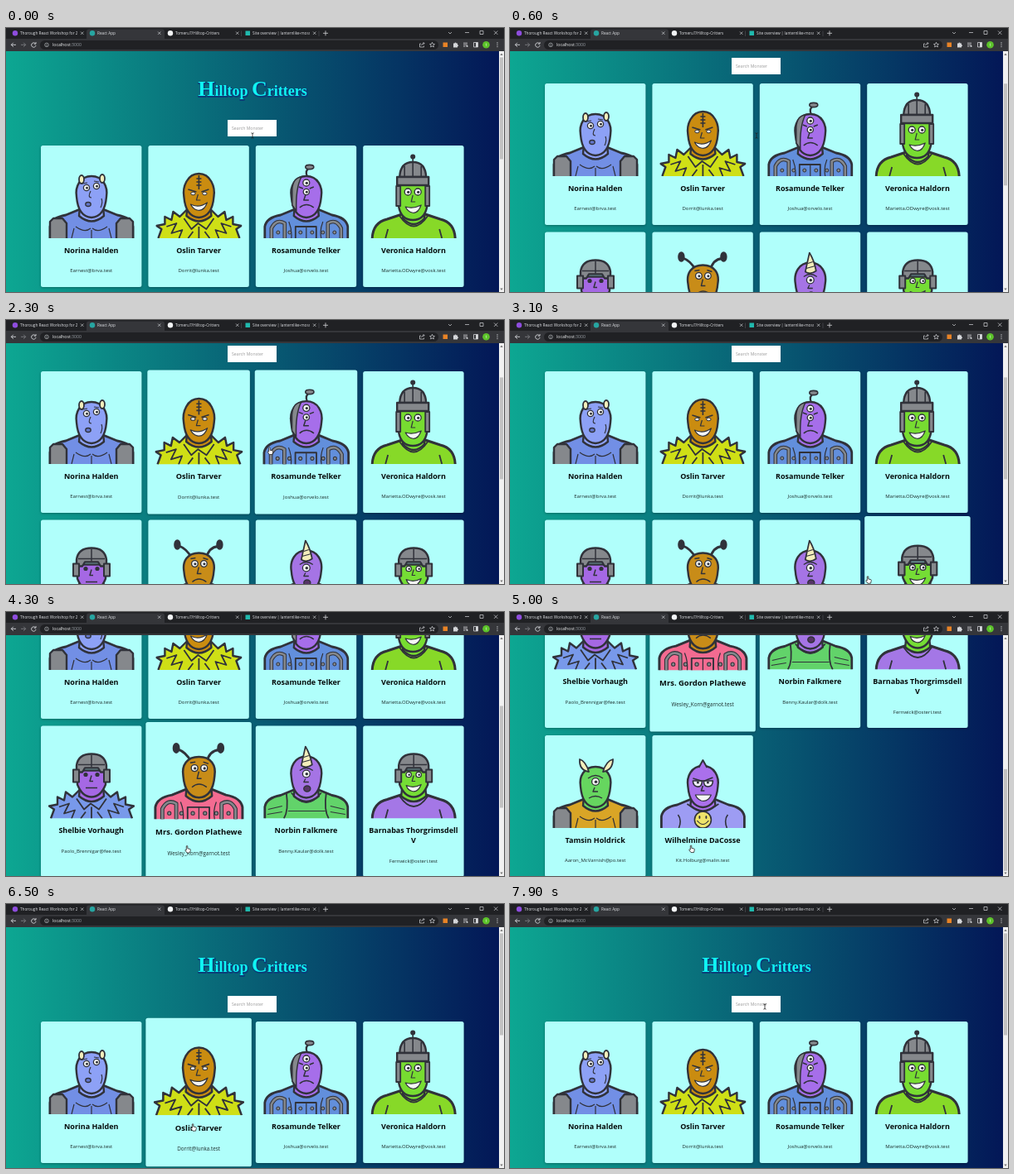
Write an HTML page with a canvas that moves like this. It is 600x319 px and loops after 8000 ms.

```html
<!DOCTYPE html>
<html lang="en">
<head>
<meta charset="utf-8">
<title>React App</title>
<style>
  html, body { margin: 0; width: 100%; height: 100%; overflow: hidden; background: #202124; }
  canvas { display: block; width: 600px; height: 319px; }
</style>
</head>
<body>
<canvas id="stage" width="600" height="319"></canvas>
<script>
const ctx = document.getElementById('stage').getContext('2d');
const LOOP = 8000, STEP = 100, TOP = 28;
const INK = '#30323a', STEEL = '#85888c', BONE = '#f3eebb', PAPER = '#b0fffb';
const SANS = '"Open Sans", "Noto Sans", sans-serif';

// ---------- drawing helpers ----------
function paint(path, fill, stroke, width) {
  if (fill) { ctx.fillStyle = fill; ctx.fill(path); }
  if (stroke) { ctx.strokeStyle = stroke; ctx.lineWidth = width; ctx.stroke(path); }
}
function shape(d, fill, stroke = INK, width = 2.4) {
  paint(new Path2D(d), fill, stroke, width);
}
function line(d, color = INK, width = 1.2) { shape(d, null, color, width); }
function oval(x, y, rx, ry, fill, stroke = INK, width = 2.4) {
  const path = new Path2D();
  path.ellipse(x, y, rx, ry, 0, 0, 7);
  paint(path, fill, stroke, width);
}
function dot(x, y, r, fill) { oval(x, y, r, r, fill, null); }
function box(x, y, w, h, fill, r = 0) {
  const path = new Path2D();
  path.roundRect(x, y, w, h, r);
  paint(path, fill);
}
function text(str, x, y, font, color, align = 'left') {
  ctx.font = font;
  ctx.fillStyle = color;
  ctx.textAlign = align;
  ctx.fillText(str, x, y);
}
function eye(x, y, r = 3.6) {
  oval(x, y, r, r, '#f4f6f4', INK, 1.3);
  dot(x + .5, y + .3, r * .4, INK);
}

// ---------- monster bodies, in a 102 x 102 box ----------
const torso = (suit) =>
  shape('M1,102 V88 Q3,77 20,74 L37,67 H65 L82,74 Q99,77 101,88 V102', suit, INK, 2.8);

const bodies = {
  pads(suit) {
    torso(suit);
    shape('M1,102 V82 L5,78 H16 L21,84 V102', STEEL);
    shape('M101,102 V82 L97,78 H86 L81,84 V102', STEEL);
    line('M27,102 L30,90 M75,102 L72,90 M51,102 V92 M32,88 Q43,96 50,90 M70,88 Q59,96 52,90');
  },
  spikes(suit) {
    shape('M2,102 L6,91 L0,87 L10,85 L10,76 L18,80 L20,70 L28,76 L37,67 H65 L74,76 L82,70 '
      + 'L84,80 L92,76 L92,85 L102,87 L96,91 L100,102', suit);
    line('M12,88 L24,84 L18,96 L31,92 L27,102 M90,88 L78,84 L84,96 L71,92 L75,102', INK, 1.8);
    line('M33,78 L42,91 L50,84 L60,91 L69,78 M38,102 L44,94 M64,102 L58,94 M51,102 V88', INK, 1.8);
  },
  pipes(suit) {
    torso(suit);
    line('M9,102 V90 Q15,78 25,84 V102 M93,102 V90 Q87,78 77,84 V102', INK, 4.6);
    line('M9,102 V90 Q15,78 25,84 V102 M93,102 V90 Q87,78 77,84 V102', STEEL, 2.6);
    shape('M38,102 V88 H63 V102', suit, INK, 1.8);
    line('M30,82 Q34,92 33,102 M71,82 Q67,92 69,102 M51,88 V102');
    for (const x of [17, 31, 44, 58, 71, 85]) oval(x, 95, 2, 2, STEEL, INK, 1);
  },
  robe(suit) {
    shape('M1,102 Q2,83 19,79 L37,73 H65 L83,79 Q100,83 101,102', suit, INK, 3);
    line('M34,75 Q51,100 68,75 M17,102 L20,91 M85,102 L82,91', INK, 1.8);
  },
  vest(suit) {
    torso(suit);
    line('M27,71 Q30,92 24,102 M75,71 Q72,92 78,102 M33,71 Q51,94 69,71', INK, 1.8);
    line('M29,93 H74 M5,91 L22,87 M97,91 L80,87 M4,97 L22,94 M98,97 L80,94');
  },
  badge(suit) {
    torso(suit);
    line('M22,102 Q26,92 21,86 M80,102 Q76,92 81,86 M32,73 Q51,87 70,73', INK, 1.6);
    oval(51, 92, 10, 10, '#eee36a', INK, 1.6);
    oval(47, 89, 1, 2, INK, null);
    oval(55, 89, 1, 2, INK, null);
    line('M44,93 Q51,102 58,93');
  }
};

// ---------- monster heads ----------
const neck = (skin) => shape('M37,64 L36,75 Q51,88 66,75 L65,64', skin);
const skull = (skin, top = 27) =>
  shape(`M51,${top} C65,${top} 71,40 69,52 Q67,76 51,77 Q35,76 33,52 C31,40 37,${top} 51,${top}Z`, skin);

function helmeted(skin) {
  neck(skin);
  shape('M34,44 H68 V61 Q62,76 51,76 Q40,76 34,61Z', skin);
  shape('M33,46 V38 Q35,24 51,24 Q67,24 69,38 V46 H62 L59,41 H43 L40,46Z', STEEL);
  line('M51,25 V40 M35,37 H67', INK, 1.5);
  shape('M29,43 H36 V58 H29Z M66,43 H73 V58 H66Z', STEEL, INK, 2);
}

const heads = {
  horned(skin) {
    neck(skin); skull(skin);
    oval(39, 31, 3, 5, BONE, INK, 1.8);
    oval(64, 30, 3, 5, BONE, INK, 1.8);
    eye(45, 41); eye(57, 39);
    line('M50,45 Q46,53 51,53 M40,36 L46,35 M54,33 L60,34');
    oval(47, 61, 3.2, 2.5, '#6376cb', INK, 1.3);
    line('M63,54 Q65,59 62,65');
  },
  stitched(skin) {
    neck(skin); skull(skin, 24);
    line('M51,26 V43 M48,30 H54 M48,34 H54 M48,38 H54 M38,43 L48,46 M63,43 L54,46', INK, 1.6);
    oval(44, 48, 2.7, 1.8, '#f4f6f4', INK, 1);
    oval(58, 48, 2.7, 1.8, '#f4f6f4', INK, 1);
    line('M50,49 L48,56 H53');
    shape('M41,61 Q51,66 61,59 Q57,70 49,68 Q44,67 41,61Z', '#f4f6f4', INK, 1.2);
  },
  antenna(skin) {
    neck(skin); skull(skin);
    shape('M34,62 V43 Q35,29 45,28 Q38,42 39,69Z', STEEL, INK, 1.5);
    line('M52,27 Q49,20 55,17', INK, 2.2);
    oval(55, 16, 5, 2.6, STEEL, INK, 1.6);
    eye(51, 35, 4); eye(51, 46, 3.6);
    line('M42,40 L47,42 M60,40 L55,42 M50,50 L48,56 H54 M43,65 Q51,58 60,65', INK, 1.5);
  },
  dome(skin) {
    shape('M38,68 V78 Q51,92 64,78 V68', skin);
    shape('M33,37 H67 V64 Q64,80 50,80 Q36,80 33,64Z', skin);
    shape('M34,28 Q35,10 50,10 Q65,10 66,28Z', STEEL);
    shape('M31,28 H69 V38 H31Z', STEEL);
    shape('M30,39 H35 V63 H30Z M65,39 H70 V63 H65Z', STEEL, INK, 1.8);
    line('M50,10 V4 M40,15 V27 M50,11 V27 M60,15 V27', INK, 1.6);
    dot(50, 3.5, 3, INK);
    eye(44, 46, 4); eye(56, 46, 4);
    line('M50,50 L48,58 H53');
    shape('M41,64 Q50,67 60,62 Q56,73 49,71 Q44,70 41,64Z', '#f4f6f4', INK, 1.2);
  },
  visor(skin) {
    helmeted(skin);
    dot(44, 49, 2.6, INK); dot(58, 49, 2.6, INK);
    line('M51,50 L49,57 H53 M44,65 H58', INK, 1.5);
  },
  feelers(skin) {
    line('M42,36 Q37,25 26,21 M60,36 Q63,23 74,22', INK, 2.8);
    oval(25, 20, 3, 5, INK); oval(76, 20, 3, 5, INK);
    neck(skin); skull(skin, 30);
    eye(46, 43, 3.8); eye(57, 43, 3.8);
    line('M41,37 L47,36 M56,36 L62,38 M51,47 L49,55 H54 M43,65 Q51,58 60,65', INK, 1.4);
  },
  unicorn(skin) {
    neck(skin); skull(skin);
    shape('M45,38 L50,15 Q56,25 58,37 Q51,42 45,38Z', BONE, INK, 1.7);
    line('M48,28 L54,26 M46,34 L57,31');
    eye(51, 48, 4.4);
    line('M43,44 Q51,38 59,44 M50,54 L48,58 H54', INK, 1.3);
    oval(52, 66, 4, 3.5, '#563466', INK, 1.4);
  },
  pilot(skin) {
    helmeted(skin);
    eye(45, 49, 3.2); eye(57, 49, 3.2);
    line('M51,50 L49,57 H53');
    shape('M42,62 Q51,66 60,61 Q56,71 49,69 Q44,68 42,62Z', '#f4f6f4', INK, 1.2);
  },
  bull(skin) {
    neck(skin); skull(skin, 28);
    shape('M43,34 Q31,32 32,19 Q39,21 43,34Z', BONE, INK, 1.8);
    shape('M60,34 Q72,32 72,19 Q64,21 60,34Z', BONE, INK, 1.8);
    eye(51, 46, 4.4);
    line('M42,42 Q51,35 60,42 M50,53 L48,58 H54 M43,66 Q51,61 59,66', INK, 1.4);
  },
  tipped(skin) {
    neck(skin); skull(skin);
    shape('M46,29 L51,20 L56,29', skin, INK, 2);
    shape('M39,45 H50 Q50,53 44,52 Q39,51 39,45Z M52,45 H63 Q63,52 57,52 Q52,52 52,45Z', '#f1efff', INK, 1.6);
    dot(45, 47, 1.5, INK); dot(57, 47, 1.5, INK);
    line('M39,42 L49,45 L53,45 L63,41 M51,51 L49,57 H53', INK, 1.6);
    shape('M42,62 H61 Q57,71 49,69 Q44,67 42,62Z', '#f4f6f4', INK, 1.2);
  }
};

const monsters = [
  ['Norina Halden', 'Earnest@brva.test', 'horned', '#8da1f6', 'pads', '#728fe5'],
  ['Oslin Tarver', 'Dorrit@lunka.test', 'stitched', '#ca8c10', 'spikes', '#cfdf16'],
  ['Rosamunde Telker', 'Joshua@orvelo.test', 'antenna', '#a66eea', 'pipes', '#628fdc'],
  ['Veronica Haldorn', 'Marietta.ODwyre@vosk.test', 'dome', '#77dc31', 'robe', '#87d928'],
  ['Shelbie Vorhaugh', 'Paolo_Brennigar@fee.test', 'visor', '#a568e4', 'spikes', '#7899ea'],
  ['Mrs. Gordon Plathewe', 'Wesley_Korn@garnot.test', 'feelers', '#c88c18', 'pipes', '#f36b91'],
  ['Norbin Falkmere', 'Benny.Kaular@dolk.test', 'unicorn', '#a574e5', 'vest', '#62d36a'],
  ['Barnabas Thorgrimsdell|V', 'Fernwick@osteri.test', 'pilot', '#75dd35', 'robe', '#a477e6'],
  ['Tamsin Holdrick', 'Aaron_McVarnish@po.test', 'bull', '#66d65f', 'pads', '#d9a526'],
  ['Wilhelmine DaCosse', 'Kit.Holburg@malin.test', 'tipped', '#aa70ec', 'badge', '#9d9cf3']
];
const rows = [[142, 171], [321.5, 182.5], [513, 171]];

// ---------- motion ----------
const scrollKeys = [[0, 0], [200, 0], [300, 12], [400, 38], [500, 62], [600, 75], [700, 80],
  [4100, 80], [4200, 112], [4300, 184], [4400, 253], [4500, 314], [4600, 352], [4700, 364],
  [5000, 364], [5100, 338], [5200, 268], [5300, 184], [5400, 110], [5500, 56], [5600, 25],
  [5700, 6], [5800, 0], [LOOP, 0]];
const cursorKeys = [[0, 297, 130], [900, 297, 130], [1200, 215, 145], [1600, 146, 151],
  [1800, 146, 151], [2100, 235, 155], [2400, 360, 160], [2650, 475, 170], [2850, 475, 250],
  [3100, 432, 314], [3400, 350, 304], [3700, 265, 290], [4000, 219, 287], [5600, 219, 286],
  [6500, 226, 270], [7000, 245, 215], [7500, 300, 130], [7900, 307, 124], [LOOP, 307, 124]];
// card index, pointer enters, pointer leaves
const hovers = [[1, 1000, 1250], [0, 1300, 1850], [1, 1900, 2150], [2, 2200, 2450], [3, 2500, 2800],
  [7, 2850, 3250], [6, 3300, 3600], [5, 3650, 5750], [1, 5800, 7250]];

const clamp = (v) => Math.max(0, Math.min(1, v));
const ease = (v) => { v = clamp(v); return v * v * (3 - 2 * v); };
function sample(keys, t) {
  const i = Math.max(1, keys.findIndex((k) => k[0] >= t));
  const a = keys[i - 1], b = keys[i], u = clamp((t - a[0]) / (b[0] - a[0]));
  return a.slice(1).map((v, n) => v + (b[n + 1] - v) * u);
}
function growth(index, t) {
  const amounts = hovers.filter((h) => h[0] === index)
    .map(([, enter, leave]) => ease((t - enter) / 250) * (1 - ease((t - leave) / 250)));
  return 1 + .05 * Math.max(0, ...amounts);
}

// ---------- page ----------
function drawCard(index, t, scroll) {
  const [name, mail, head, skin, body, suit] = monsters[index];
  const [rowTop, height] = rows[Math.floor(index / 4)];
  const x = 42 + index % 4 * 129.4, y = rowTop - scroll, width = 121.4;
  if (y > 330 || y + height < 10) return;
  const scale = growth(index, t);
  ctx.save();
  ctx.translate(x + width / 2, y + height / 2);
  ctx.scale(scale, scale);
  ctx.translate(-width / 2, -height / 2);
  ctx.shadowColor = 'rgba(0,0,0,.3)';
  ctx.shadowBlur = 3;
  ctx.shadowOffsetY = 1;
  box(0, 0, width, height, PAPER, 2.5);
  ctx.shadowColor = 'transparent';

  ctx.save();
  ctx.translate(10, 10);
  ctx.beginPath();
  ctx.rect(-1, -1, 104, 103);
  ctx.clip();
  bodies[body](suit);
  heads[head](skin);
  ctx.restore();

  const lines = name.split('|');
  lines.forEach((s, i) => text(s, width / 2, 129.5 + i * 12.3, `bold 9px ${SANS}`, '#050b0b', 'center'));
  text(mail, width / 2, 153 + (lines.length - 1) * 12.3, `6px ${SANS}`, '#1c2b2b', 'center');
  ctx.restore();
}

function drawTitle(y) {
  const font = (ch) => `bold ${/[A-Z]/.test(ch) ? 26 : 18}px "Liberation Serif", serif`;
  const letters = [...'Hilltop Critters'];
  const widths = letters.map((ch) => { ctx.font = font(ch); return ctx.measureText(ch).width; });
  let x = 297 - widths.reduce((a, b) => a + b) / 2;
  letters.forEach((ch, i) => {
    ctx.font = font(ch);
    ctx.textAlign = 'left';
    ctx.lineWidth = 2;
    ctx.strokeStyle = '#0b3d78';
    ctx.strokeText(ch, x + .5, y + .7);
    text(ch, x, y, font(ch), '#0ff5f3');
    x += widths[i];
  });
}

function drawPage(t, scroll) {
  const sky = ctx.createLinearGradient(0, 0, 594, 0);
  sky.addColorStop(0, '#0da792');
  sky.addColorStop(1, '#031757');
  ctx.fillStyle = sky;
  ctx.fillRect(0, TOP, 594, 291);
  drawTitle(82 - scroll);
  box(267, 111 - scroll, 59, 20, '#fff');
  text('Search Monster', 272, 122.8 - scroll, `5.2px ${SANS}`, '#9a9a9a');
  monsters.forEach((m, i) => drawCard(i, t, scroll));

  box(594, TOP, 6, 291, '#f1f1f1');
  box(595, 35.5 + scroll * .424, 4, 123, '#c1c1c1');
  shape('M595.3,33 L597,30.5 L598.7,33Z', '#777', null);
  shape('M595.3,314.5 L597,317 L598.7,314.5Z', '#777', null);
}

// ---------- browser frame ----------
function drawTab(x, title, color, square) {
  if (square) box(x + 4.5, 3.5, 5.5, 5.5, color);
  else dot(x + 7, 6.3, 3.2, color);
  ctx.save();
  ctx.beginPath();
  ctx.rect(x + 13, 0, 69, 13);
  ctx.clip();
  text(title, x + 13, 8.2, `4.7px ${SANS}`, '#dfe1e5');
  ctx.restore();
  line(`M${x + 86},4.5 l3.4,3.4 m0,-3.4 l-3.4,3.4`, '#cfd1d4', .7);
}

function drawBrowser() {
  box(0, 0, 600, 14, '#202124');
  box(97, 1.5, 94, 14, '#35363a', 3);
  box(0, 13, 600, 15, '#35363a');
  drawTab(4, 'Thorough React Workshop for 2024', '#8e4dde');
  drawTab(97, 'React App', '#27a5a1');
  drawTab(191, 'Tomeru7/Hilltop-Critters', '#f1f3f4');
  drawTab(284, 'Site overview | lanternlike-moss', '#20b9ad', true);
  const light = '#d3d5d8';
  line('M283.5,3.5 V10 M377,3.5 V10', '#55575b', .6);
  line('M382,6.3 H388 M385,3.3 V9.3', light, .8);
  line('M533,5 l2,2 l2,-2 M553,5.5 H558 M571,3.5 h4 v4 h-4Z M588,3.5 l4.4,4.4 m0,-4.4 l-4.4,4.4', light, .7);

  box(41, 15, 480, 11, '#202124', 5.5);
  line('M12,20.3 H6.3 M8.8,17.8 L6.3,20.3 L8.8,22.8', light, .9);
  line('M18,20.3 H23.7 M21.2,17.8 L23.7,20.3 L21.2,22.8', '#7b7d80', .9);
  line('M35.4,18.8 A2.7,2.7 0 1 0 36,21 M36,17 V19.2 H33.8', light, .9);
  oval(49, 20.4, 2.3, 2.3, null, '#b7babd', .7);
  line('M49,20 V21.7 M49,18.9 V19.4', '#b7babd', .7);
  ctx.font = `5.2px ${SANS}`;
  const host = 'localhost', hostWidth = ctx.measureText(host).width;
  text(host, 56, 22.3, ctx.font, '#f1f3f4');
  text(':3000', 56 + hostWidth, 22.3, ctx.font, '#9aa0a6');

  line('M500,19 H498.5 V23 H503.5 V21.5 M500.5,21 Q501,18.5 504,18.5 M502.5,17 L504,18.5 L502.5,20', light, .7);
  line('M513.5,17.3 l.9,2 2.1,.2 -1.6,1.4 .5,2.1 -1.9,-1.1 -1.9,1.1 .5,-2.1 -1.6,-1.4 2.1,-.2Z', light, .7);
  box(526.5, 17.5, 5.5, 5.5, '#e88326');
  shape('M539,18.5 h1.5 a1,1 0 1 1 2,0 h1.5 v1.7 a1,1 0 1 1 0,2 v1.3 h-5Z', light, null);
  line('M551,18.2 h5 M551,20.2 h5 M551,22.2 h2.5', light, .8);
  dot(555.5, 22, 1.1, light);
  line('M563.5,17.5 h5 v5.5 h-5Z', light, .8);
  box(566, 17.5, 2.7, 5.5, light);
  dot(578.5, 20.3, 4.3, '#5cc32a');
  text('t', 578.5, 22, `4.5px ${SANS}`, '#fff', 'center');
  for (const y of [18, 20.3, 22.6]) dot(592, y, .65, light);
}

function drawCursor(t, x, y) {
  ctx.save();
  ctx.translate(x, y);
  if (t < 1000 || t >= 7400) {
    line('M-1.6,-3.2 Q0,-3.2 0,-2 V2 Q0,3.2 -1.6,3.2 M1.6,-3.2 Q0,-3.2 0,-2 M0,2 Q0,3.2 1.6,3.2', '#222', .8);
  } else {
    shape('M-1.7,-4 Q-.9,-4.8 -.2,-4 V-1 L2.8,-.4 Q3.5,0 3.2,1.5 L2.5,4.2 H-1 L-3.2,1.2 Q-3,-.2 -1.7,.8Z',
      '#fff', '#222', .8);
  }
  ctx.restore();
}

function render(now) {
  const t = Math.floor(now % LOOP / STEP) * STEP;
  ctx.lineJoin = 'round';
  drawPage(t, sample(scrollKeys, t)[0]);
  drawBrowser();
  drawCursor(t, ...sample(cursorKeys, t));
}

const start = performance.now();
function tick() {
  render(performance.now() - start);
  requestAnimationFrame(tick);
}
tick();
</script>
</body>
</html>
```
